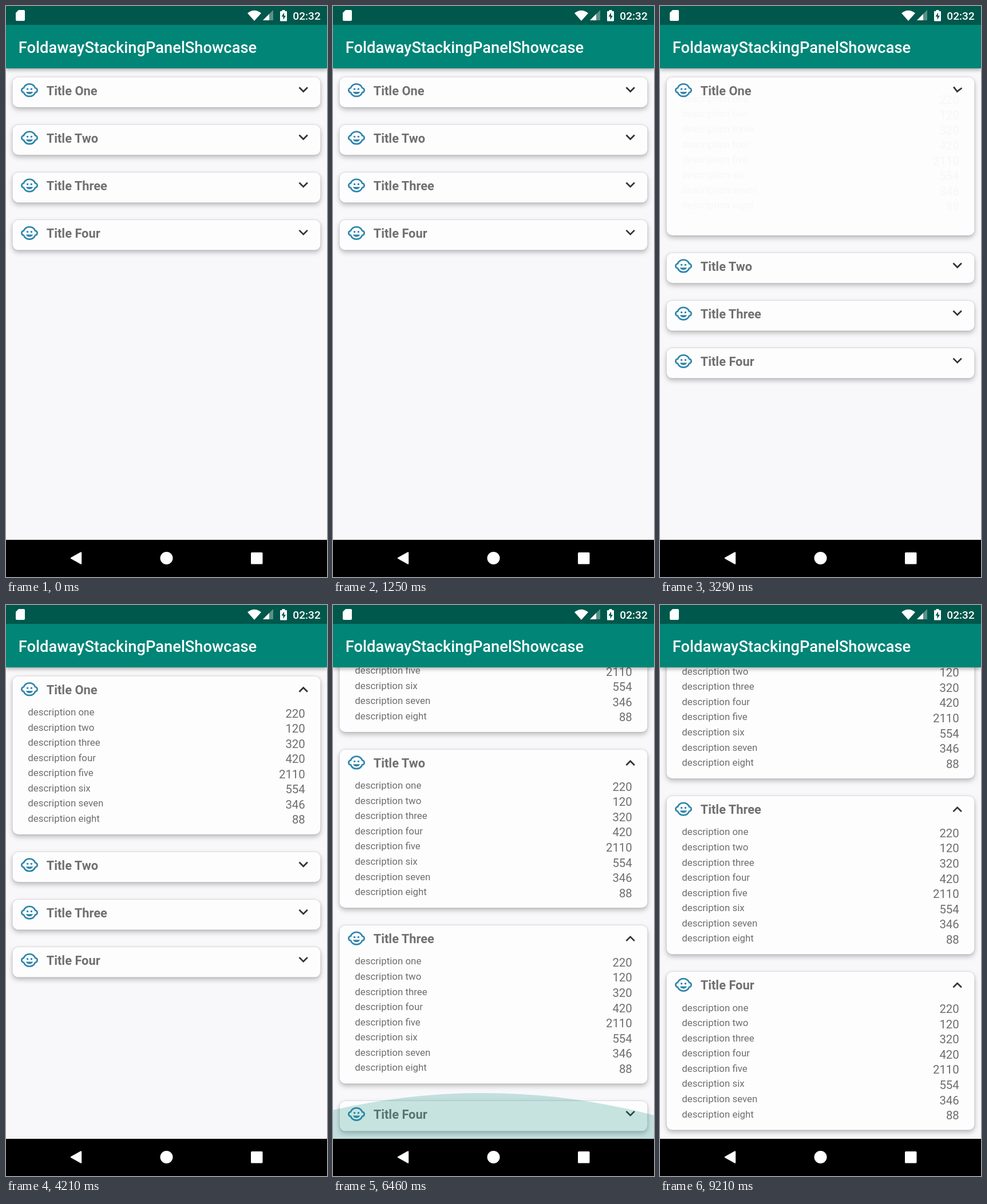
An HTML page that plays this animation: 561x998 px, repeating every 9.25 s.

```html
<!DOCTYPE html>
<html lang="en">
<head>
<meta charset="utf-8">
<title>Expanding cards</title>
<style>
  html, body { margin: 0; width: 100%; height: 100%; overflow: hidden; background: #f8f8fb; }
  svg { display: block; width: 561px; height: 998px; font-family: Roboto, sans-serif; }
  .card { fill: #fdfdfd; filter: drop-shadow(0 0 1px rgba(0,0,0,.22)) drop-shadow(0 4px 4px rgba(0,0,0,.25)); }
  .title { font-size: 21.84px; font-weight: 700; fill: #707070; }
  .label { font-size: 16.9px; fill: #6e6e6e; }
  .value { font-size: 20.4px; fill: #6e6e6e; text-anchor: end; }
  .face { fill: none; stroke: #2e86ab; stroke-width: 2; }
  .face .solid { fill: #2e86ab; stroke: none; }
  .bar { fill: #008577; filter: drop-shadow(0 3px 3px rgba(0,0,0,.3)); }
</style>
</head>
<body>
<svg viewBox="0 0 561 998">
  <rect width="561" height="998" fill="#f8f8fb"/>
  <g id="list"></g>
  <path id="glow" fill="#008577"/>

  <rect class="bar" y="20" width="561" height="89"/>
  <rect width="561" height="33" fill="#00574b"/>
  <text x="21.8" y="81.5" font-size="27.3" font-weight="500" fill="#fff">FoldawayStackingPanelShowcase</text>

  <g fill="#fff">
    <path d="M22 7H31Q33 7 33 9V24Q33 26 31 26H19Q17 26 17 24V12Z"/>
    <path d="M422 12.5Q434 3 446 12.5L434 26Z"/>
    <path d="M467 7V25H449Z" opacity=".35"/>
    <path d="M460 14V25H449Z"/>
    <path d="M482.5 9V7H487.500V9H490Q491 9 491 10V25.500Q491 26.500 490 26.500H480Q479 26.500 479 25.500V10Q479 9 480 9Z"/>
    <text x="501.3" y="24" font-size="19.1" font-weight="500">02:32</text>
  </g>
  <path d="M486 11.500L481.500 18.500H484.500V24L489 17H486Z" fill="#00574b"/>

  <rect y="933" width="561" height="65" fill="#000"/>
  <g fill="#fff">
    <path d="M114 965L131 955.5V974.5Z" stroke="#fff" stroke-width="2.4" stroke-linejoin="round"/>
    <circle cx="280.500" cy="965" r="11"/>
    <rect x="428" y="955" width="20.500" height="20.500" rx="1.5"/>
  </g>
</svg>
<script>
const LOOP = 9250, UNIT = 1.365;
const TOP = 124.5, PITCH = 83.2, CLOSED = 52.5, EXTRA = 224;
const BOTTOM = 933, OPEN_MS = 400, SLIDE = 27.3, ROW = 26.57;

const titles = ['One', 'Two', 'Three', 'Four'];
const openAt = [3275, 4320, 5350, 7200];
const words = ['one', 'two', 'three', 'four', 'five', 'six', 'seven', 'eight'];
const values = [220, 120, 320, 420, 2110, 554, 346, 88];

// start and end times, then distance
const scrolls = [[6230, 6430, 179], [7820, 8050, 226]];
// pull, peak, release and end times, then height, opacity and apex x
const glows = [
  [6390, 6455, 6540, 6680, 80, .22, 262],
  [8010, 8085, 8140, 8420, 82, .095, 287]
];

const clamp = v => Math.max(0, Math.min(1, v));
const ramp = (t, a, b) => clamp((t - a) / (b - a));
const smooth = p => p * p * (3 - 2 * p);

const rows = words.map((word, i) => `
  <text class="label" x="38.3" y="${68.5 + i * ROW}">description ${word}</text>
  <text class="value" x="522.8" y="${72 + i * ROW}">${values[i]}</text>`).join('');

const list = document.getElementById('list');
const glow = document.getElementById('glow');

list.innerHTML = titles.map(name => `
  <g>
    <rect class="card" x="11.500" width="538" rx="10"/>
    <g class="rows">${rows}</g>
    <g class="face" transform="translate(41 22.7) scale(${UNIT}) translate(-12 -12)">
      <path d="M4.6 9.1A8 8 0 0 1 19.4 9.1A2.6 2.9 0 0 1 19.4 14.9A8 8 0 0 1 4.6 14.9A2.6 2.9 0 0 1 4.6 9.1Z"/>
      <g class="solid">
        <circle cx="9.5" cy="10.5" r="1.25"/>
        <circle cx="14.5" cy="10.5" r="1.25"/>
        <path d="M7.5 14H16.5A4.9 4.9 0 0 1 7.5 14Z"/>
      </g>
    </g>
    <text class="title" x="70.700" y="31">Title ${name}</text>
    <path class="arrow" fill="#333" d="M7.41 7.84L12 12.42L16.59 7.84L18 9.25L12 15.25L6 9.25Z"/>
  </g>`).join('');

const cards = [...list.children].map(node => ({
  node,
  rect: node.querySelector('.card'),
  rows: node.querySelector('.rows'),
  arrow: node.querySelector('.arrow')
}));

function drawCards(t) {
  let y = TOP;
  for (const [from, to, dist] of scrolls) y -= dist * smooth(ramp(t, from, to));
  cards.forEach((card, i) => {
    const open = t >= openAt[i];
    const p = ramp(t, openAt[i], openAt[i] + OPEN_MS);
    card.node.setAttribute('transform', `translate(0 ${y})`);
    card.rect.setAttribute('height', CLOSED + (open ? EXTRA : 0));
    card.rows.setAttribute('opacity', p);
    card.rows.setAttribute('transform', `translate(0 ${-SLIDE * (1 - p) ** 2})`);
    card.arrow.setAttribute('transform',
      `translate(519.7 22.5) rotate(${180 * p}) scale(${UNIT}) translate(-12 -12)`);
    y += PITCH + (open ? EXTRA : 0);
  });
}

function drawGlow(t) {
  const g = glows.find(([from, , , to]) => t > from && t < to);
  glow.setAttribute('opacity', 0);
  if (!g) return;
  const [from, peak, release, to, height, alpha, cx] = g;
  const k = ramp(t, from, peak) * (1 - smooth(ramp(t, release, to)));
  const edge = x => BOTTOM - k * (height - (x - cx) ** 2 / 2300);
  const mid = edge(0) + cx * k * (561 - cx) / 1150 * 0 + 0;
  // a parabola through both sides, with its control point on the two tangents
  const ctrl = mid - 280.5 * k * cx / 1150;
  glow.setAttribute('d', `M0 ${BOTTOM}V${edge(0)}Q280.5 ${ctrl} 561 ${edge(561)}V${BOTTOM}Z`);
  glow.setAttribute('opacity', alpha * k);
}

function frame(now) {
  const t = now % LOOP;
  drawCards(t);
  drawGlow(t);
  requestAnimationFrame(frame);
}
frame(0);
</script>
</body>
</html>
```
